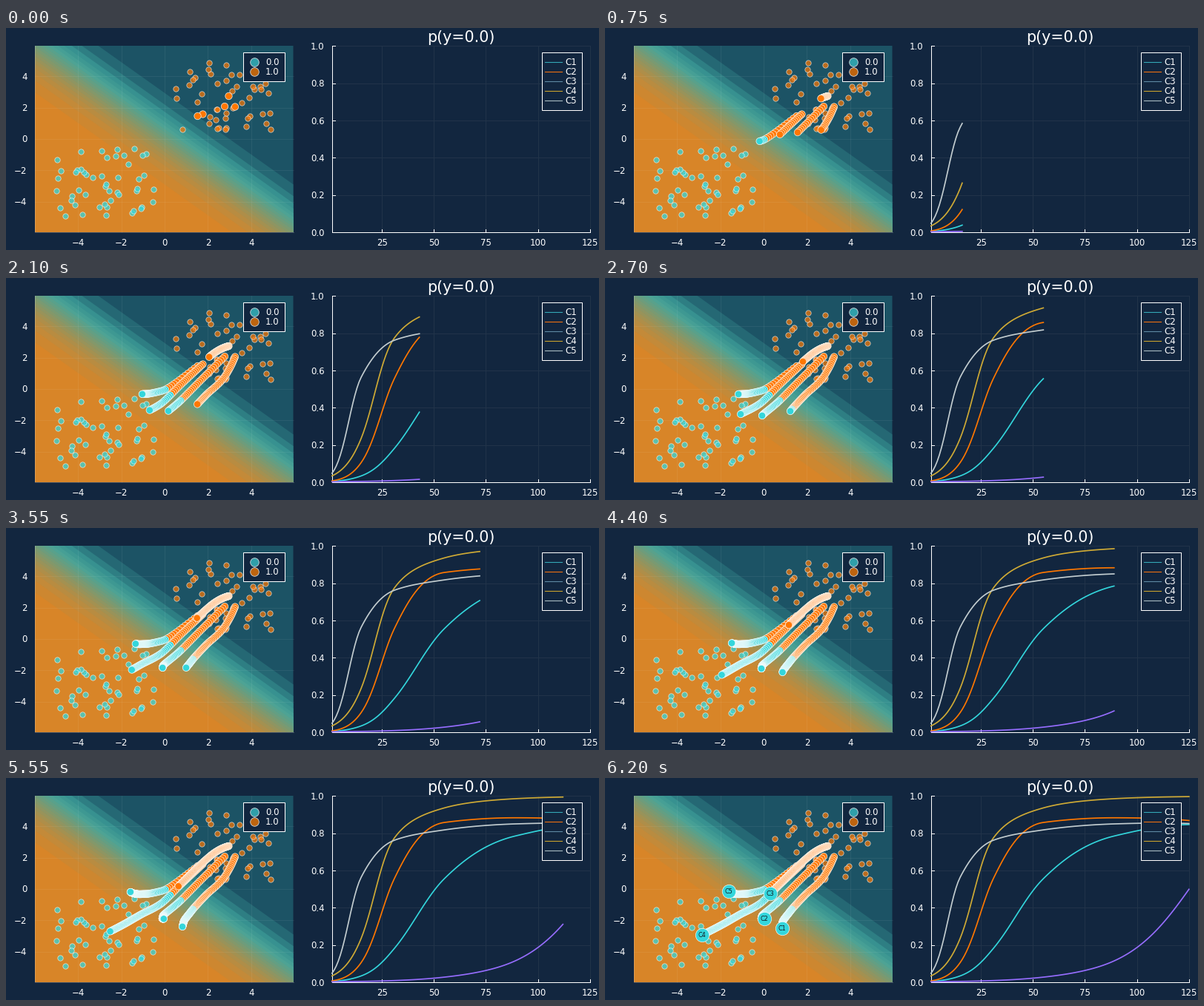
Write a matplotlib script that moves like this. It is 800 px wide and 300 px high and loops after 6.25 s.

```python
import numpy as np
import matplotlib.pyplot as plt
from matplotlib.animation import FuncAnimation
from matplotlib.patches import Rectangle

W, H, DPI = 800, 300, 100
PT = 72 / DPI  # points per pixel
STEPS, INTERVAL = 125, 50

BG, GRID, CYAN, ORANGE = "#12263f", "#213349", "#33d6dc", "#ff7700"
LEFT, RIGHT, TOP, BOTTOM = 39, 387.5, 24.4, 276.2
CHART_L, CHART_R = 439.8, 787.8
SLOPE, MID, SPREAD = 0.712, 25, 21  # classifier boundary and softness in pixels

# Each search path passes through these points at the shared key steps.
KEY_STEPS = np.array([1, 15, 31, 55, 89, 125.0])
PATHS = {
    "C1": [(309, 106.5), (293, 136), (270, 158), (250, 180), (239.5, 195), (238.5, 203)],
    "C2": [(295, 106), (262, 139), (233, 168), (212, 186), (211, 190), (215, 190)],
    "C3": [(300.5, 92), (292, 95), (281.5, 101), (267, 113), (248, 131), (223, 156)],
    "C4": [(265.5, 116.5), (238, 142), (207.5, 171), (183, 184), (157.5, 198.5), (131, 212)],
    "C5": [(258.5, 119), (210.5, 152.5), (189.5, 156.7), (180, 157), (171, 155.5), (167, 153)],
}
CURVE_COLORS = [CYAN, ORANGE, "#966dff", "#d0ab35", "#c3cdd0"]
LEGEND_COLORS = ["#34a8b6", "#ee7010", "#5f8aa4", "#c9a22c", "#a9bcc2"]


def smooth(x, y, t):
    """Monotone cubic interpolation."""
    h, d = np.diff(x), np.diff(y) / np.diff(x)
    m = np.zeros(len(x))
    m[0] = d[0] + h[0] * (d[0] - d[1]) / (h[0] + h[1])
    m[-1] = d[-1] + h[-1] * (d[-1] - d[-2]) / (h[-1] + h[-2])
    for i in range(1, len(d)):
        if d[i - 1] * d[i] > 0:
            a, b = 2 * h[i] + h[i - 1], h[i] + 2 * h[i - 1]
            m[i] = (a + b) / (a / d[i - 1] + b / d[i])
    i = np.clip(np.searchsorted(x, t, side="right") - 1, 0, len(h) - 1)
    s = (t - x[i]) / h[i]
    return (y[i] * (1 + 2 * s) * (1 - s) ** 2 + y[i + 1] * s * s * (3 - 2 * s)
            + h[i] * s * (1 - s) * (m[i] * (1 - s) - m[i + 1] * s))


def probability(x, y):
    return 1 / (1 + np.exp((MID - y + SLOPE * (x - LEFT)) / SPREAD))


def plane_xy(u, v):
    return 214 + 29.2 * u, 150 - 21.2 * v


def chart_x(n):
    return CHART_L + (n - 1) * (CHART_R - CHART_L) / (STEPS - 1)


def chart_y(p):
    return BOTTOM - p * (BOTTOM - TOP)


plt.rcParams["font.family"] = "DejaVu Sans"
fig = plt.figure(figsize=(W / DPI, H / DPI), dpi=DPI, facecolor=BG)
ax = fig.add_axes([0, 0, 1, 1])
ax.set(xlim=(0, W), ylim=(H, 0))
ax.axis("off")


def line(xs, ys, color="white", px=1.0, z=2, **kw):
    return ax.plot(xs, ys, color=color, lw=px * PT, zorder=z, **kw)[0]


def label(x, y, text, ha="center", px=11.8, z=12, color="white"):
    return ax.text(x, y, text, ha=ha, va="baseline", fontsize=px * PT,
                   color=color, zorder=z)


def dots(x, y, r, face, edge=(1, 1, 1, .8), px=0.8, z=4):
    return ax.scatter(x, y, s=(2 * r * PT) ** 2, color=face, edgecolors=edge,
                      linewidths=px * PT, zorder=z)


def box(x0, y0, x1, y1):
    ax.add_patch(Rectangle((x0, y0), x1 - x0, y1 - y0, fc=BG, ec="white",
                           lw=PT, zorder=10))


def draw_field(levels=20):
    stops = [0, .15, .3, 1]
    colors = np.array([(28, 83, 101), (54, 144, 144), (75, 164, 150), (216, 133, 40)]) / 255
    frame = Rectangle((LEFT, TOP), RIGHT - LEFT, BOTTOM - TOP, transform=ax.transData)
    xs = np.array([LEFT, RIGHT])
    for i in range(levels):
        d = MID + SPREAD * np.log(i / (levels - i)) if i else -H
        rgb = [np.interp(i / (levels - 1), stops, c) for c in colors.T]
        band = ax.fill_between(xs, d + SLOPE * (xs - LEFT), 2 * H, color=rgb, lw=0, zorder=1)
        band.set_clip_path(frame)


def draw_plane():
    for v in range(-4, 5, 2):
        x, y = plane_xy(v, v)
        text = str(v).replace("-", "\u2212")
        line([x, x], [TOP, BOTTOM], alpha=.06)
        line([LEFT, RIGHT], [y, y], alpha=.06)
        label(x, 293.8, text)
        label(28.5, y + 4.3, text, "right")
    line([LEFT, LEFT, RIGHT], [TOP, BOTTOM, BOTTOM], alpha=.2)
    rng = np.random.default_rng(7)
    for lo, hi, color in ((-5, -.5, (.2, .84, .86, .75)), (.5, 5, (1, .467, 0, .7))):
        dots(*plane_xy(*rng.uniform(lo, hi, (2, 50))), 3.7, color, (1, 1, 1, .65), z=3)
    box(319.5, 32.5, 375.5, 71.5)
    for y, text, color in ((45.5, "0.0", "#2fa0aa"), (58.5, "1.0", "#bd640f")):
        dots(335, y, 5.8, color, "#c8d0d4", .9, 11)
        label(350, y + 4.4, text, "left")


def draw_chart():
    for n in range(25, STEPS + 1, 25):
        x = chart_x(n)
        line([x, x], [TOP, BOTTOM], GRID, z=1)
        line([x, x], [BOTTOM - 4, BOTTOM])
        label(x, 293.8, str(n))
    for p in np.linspace(0, 1, 6):
        y = chart_y(p)
        line([CHART_L, CHART_R], [y, y], GRID, z=1)
        line([CHART_L, CHART_L + 4], [y, y])
        label(429.5, y + 4.5, f"{p:.1f}", "right")
    line([CHART_L, CHART_L, CHART_R], [TOP, BOTTOM, BOTTOM])
    label(614, 19, "p(y=0.0)", px=20.7)
    box(722.5, 32.5, 776.5, 110.5)
    for i, (name, color) in enumerate(zip(PATHS, LEGEND_COLORS)):
        y = 45.5 + 13 * i
        line([727, 750], [y, y], color, 1.1, 11)
        label(754, y + 4.4, name, "left")


draw_field()
draw_plane()
draw_chart()

steps = np.arange(1, STEPS + 1)
xy = np.array([[smooth(KEY_STEPS, axis, steps) for axis in np.transpose(pts)]
               for pts in PATHS.values()])
probs = probability(xy[:, 0], xy[:, 1])
trail_xy = xy.transpose(2, 0, 1).reshape(-1, 2)
trail_rgb = np.where(probs.T.reshape(-1, 1) >= .499, [[.2, .84, .86]], [[1, .467, 0]])

trail = dots([], [], 4.7, CYAN, z=5)
curves = [line([], [], color, 1.7, 4) for color in CURVE_COLORS]
last = xy[:, :, -1]
ends = [dots(*last.T, 9.2, CYAN, z=6)]
ends += [label(x, y + 2.9, name, px=8, z=7, color="#101820")
         for name, (x, y) in zip(PATHS, last)]


def update(k):
    n = k + 1
    trail.set_offsets(trail_xy[:len(PATHS) * n])
    trail.set_facecolors(trail_rgb[:len(PATHS) * n])
    shown = n if k else 0  # a single point draws no line
    for curve, p in zip(curves, probs):
        curve.set_data(chart_x(steps[:shown]), chart_y(p[:shown]))
    for item in ends:
        item.set_visible(n == STEPS)
    return [trail, *curves, *ends]


anim = FuncAnimation(fig, update, frames=STEPS, interval=INTERVAL,
                     init_func=lambda: update(0), repeat=True, blit=False)
plt.show()
```
